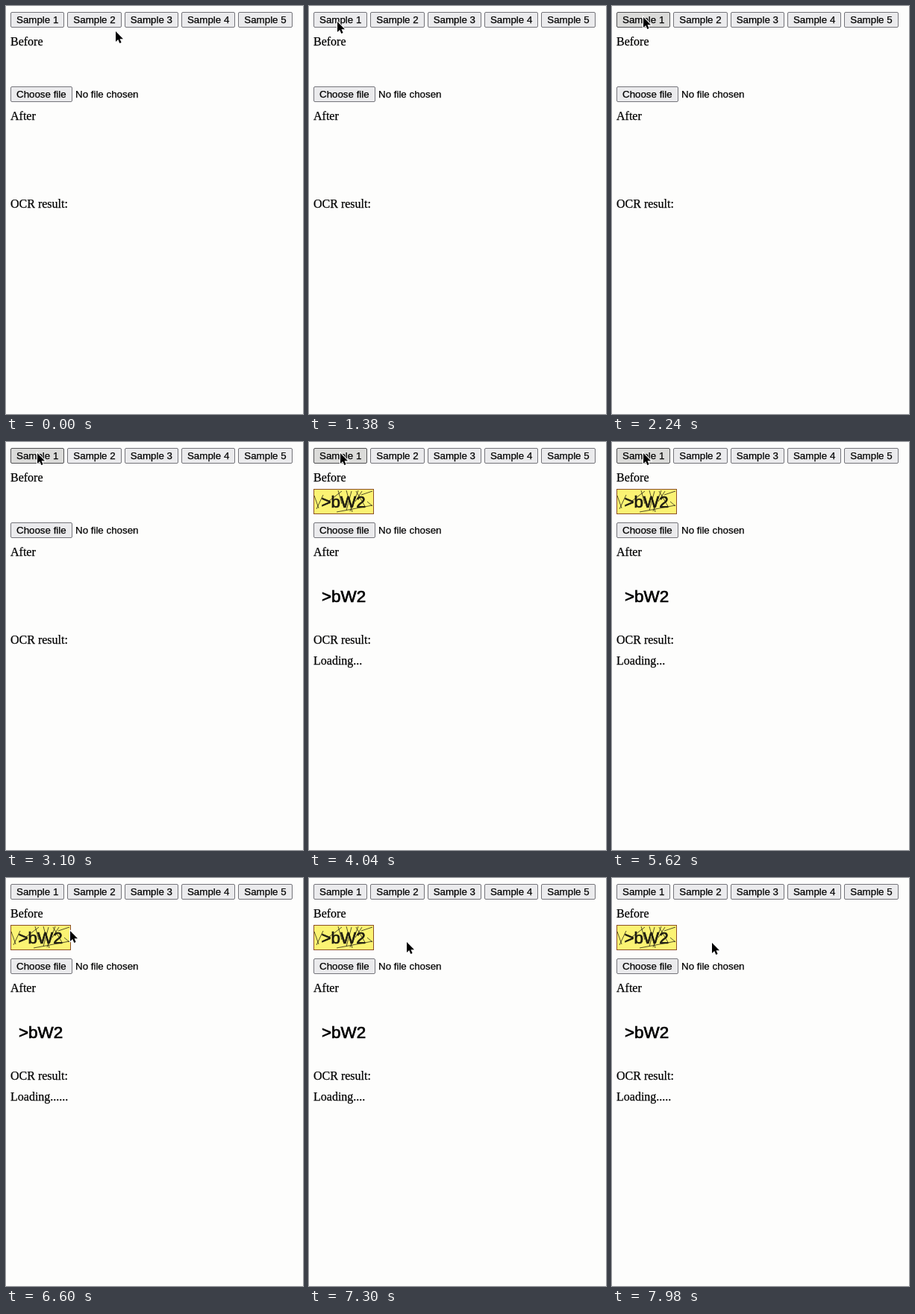
Recreate the animation shown at these times as an HTML page. Size 398 by 548 pixels, loop 8 s.

```html
<!DOCTYPE html>
<html lang="en">
<head>
<meta charset="utf-8">
<title>Image OCR demo</title>
<style>
  html, body { margin: 0; width: 100%; height: 100%; overflow: hidden; background: #fdfdfc; }
  svg { display: block; font: 16px "Liberation Serif", serif; }
  text { stroke: #000; stroke-width: .25; }
  .ui { font: 13.333px "Liberation Sans", sans-serif; }
  .code { font: 22.4px "Liberation Sans", sans-serif; stroke-width: .7; }
  .button rect { fill: #ebebed; stroke: #74747a; }
  .button.hover rect { fill: #dbdbd9; stroke: #505052; }
</style>
</head>
<body>
<svg width="398" height="548" viewBox="0 0 398 548">
  <g id="buttons" class="ui"></g>
  <text class="ui" x="93" y="123">No file chosen</text>
  <text x="6" y="53">Before</text>
  <text x="6" y="153">After</text>
  <text x="6" y="271">OCR result:</text>

  <g id="before">
    <rect x="6.5" y="63.5" width="80" height="33" fill="#fbf373" stroke="#8c4f24"/>
    <path d="M7 72l6 17M10 90l9-19M27 79l17-13M39 65l5 18M50 65l8 29M57 66l-7 26M66 65l-11 28M63 66l13 22M71 66l-9 14M37 94l48-9M70 71l15-5M78 80l7 6"
      fill="none" stroke="#2c2917" stroke-width=".8"/>
    <text class="code" x="16.5" y="88" fill="#1f1d12" style="stroke: #1f1d12">&gt;bW2</text>
  </g>
  <g id="after">
    <text class="code" x="17" y="215">&gt;bW2</text>
    <text id="loading" x="6" y="299"></text>
  </g>

  <path id="cursor" d="M0 0V14L3.2 11.1 5.3 16 7.6 15 5.5 10.3H10Z" stroke="#fff" stroke-width="2" paint-order="stroke"/>
</svg>
<script>
const LOOP = 8000, BEFORE_AT = 3460, AFTER_AT = 3920, DOT_TIME = 375;
const byId = id => document.getElementById(id);

function addButton(x, y, width, label) {
  byId('buttons').insertAdjacentHTML('beforeend',
    `<g class="button"><rect x="${Math.round(x) + .5}" y="${y + .5}" width="${width}" height="20" rx="1.5"/>
     <text x="${x + 8}" y="${y + 15}">${label}</text></g>`);
}
for (let i = 0; i < 5; i++) addButton(6 + i * 76.33, 8, i % 4 ? 72 - (i > 1) : 71 + (i > 0), `Sample ${i + 1}`);
addButton(6, 108, 82, 'Choose file');
const firstButton = document.querySelector('.button');

// Cursor stops: time, x, y
const stops = [
  [0, 147, 34], [70, 147, 34], [330, 88, 107], [960, 88, 107], [1240, 38, 21],
  [1380, 38, 21], [1700, 42, 15], [5700, 42, 15], [6560, 86, 71],
  [6700, 86, 71], [7400, 134, 87], [LOOP, 134, 87]
];

function cursorAt(t) {
  const i = stops.findIndex(stop => stop[0] > t);
  const [t0, x0, y0] = stops[i - 1], [t1, x1, y1] = stops[i];
  const p = (t - t0) / (t1 - t0), ease = p * p * (3 - 2 * p);
  return [x0 + (x1 - x0) * ease, y0 + (y1 - y0) * ease];
}

function show(id, visible) {
  byId(id).style.display = visible ? '' : 'none';
}

function draw() {
  const t = performance.now() % LOOP;
  const [x, y] = cursorAt(t);
  byId('cursor').setAttribute('transform', `translate(${Math.round(x)} ${Math.round(y)})`);
  firstButton.classList.toggle('hover', t >= 1400 && y < 29);
  show('before', t >= BEFORE_AT);
  show('after', t >= AFTER_AT);
  const dots = 3 + Math.floor(Math.max(0, t - AFTER_AT) / DOT_TIME) % 4;
  byId('loading').textContent = 'Loading' + '.'.repeat(dots);
  requestAnimationFrame(draw);
}
draw();
</script>
</body>
</html>
```
